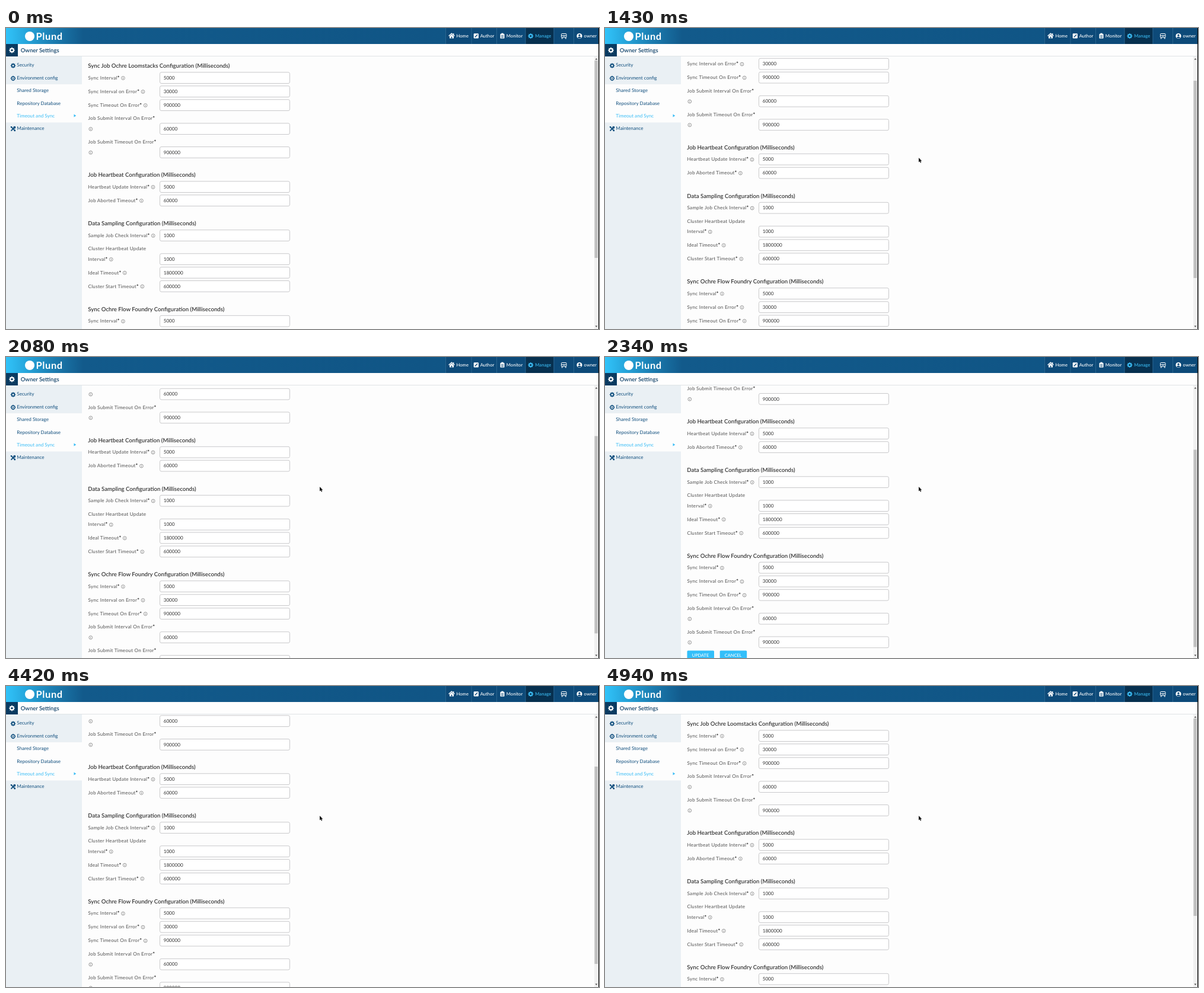
An HTML page with a canvas that plays this animation: 1000 by 508 pixels, repeating every 5590 ms.

```html
<!DOCTYPE html>
<html lang="en">
<head>
<meta charset="utf-8">
<title>Timeout and Sync</title>
<style>
html, body { margin: 0; width: 100%; height: 100%; overflow: hidden; background: #fdfdfd; }
canvas { display: block; width: 1000px; height: 508px; }
</style>
</head>
<body>
<canvas id="stage" width="1000" height="508"></canvas>
<script>
const ctx = document.getElementById('stage').getContext('2d');
const LOOP = 5590;
const CURSOR_FROM = 1430;
const NAVY = '#12507f', CYAN = '#3bbdf5', DARK = '#0a3b61', WHITE = '#fff';

const SCROLL = [
  [0, 0], [1040, 15.5], [1170, 36], [1300, 46], [1430, 46.5],
  [1690, 62], [1820, 82], [1950, 93], [2080, 107.5], [2210, 128],
  [2340, 139], [2470, 150], [2600, 153.5],
  [4420, 111], [4550, 69], [4680, 30], [4810, 6], [4940, 0]
];

const syncRows = [
  ['Sync Interval', 5000], ['Sync Interval on Error', 30000], ['Sync Timeout On Error', 900000],
  ['Job Submit Interval On Error*|', 60000], ['Job Submit Timeout On Error*|', 900000]
];
const SECTIONS = [
  { y: 64, title: 'Sync Job Ochre Loomstacks', rows: syncRows },
  { y: 248, title: 'Job Heartbeat', rows: [['Heartbeat Update Interval', 5000], ['Job Aborted Timeout', 60000]] },
  { y: 330, title: 'Data Sampling', rows: [
    ['Sample Job Check Interval', 1000], ['Cluster Heartbeat Update|Interval', 1000],
    ['Ideal Timeout', 1800000], ['Cluster Start Timeout', 600000]] },
  { y: 474.5, title: 'Sync Ochre Flow Foundry', rows: syncRows }
];

function text(str, x, y, size, color, weight = 400, spacing = 0) {
  ctx.font = `${weight} ${size}px Lato, sans-serif`;
  ctx.letterSpacing = spacing + 'px';
  ctx.fillStyle = color;
  ctx.fillText(str, x, y);
  return x + ctx.measureText(str).width;
}

function box(x, y, w, h, fill) {
  ctx.fillStyle = fill;
  ctx.fillRect(x, y, w, h);
}

function rounded(x, y, w, h, r, fill, stroke) {
  ctx.beginPath();
  ctx.roundRect(x, y, w, h, r);
  if (fill) { ctx.fillStyle = fill; ctx.fill(); }
  if (stroke) { ctx.strokeStyle = stroke; ctx.lineWidth = 1; ctx.stroke(); }
}

function disc(x, y, r, fill) {
  ctx.beginPath();
  ctx.arc(x, y, r, 0, 7);
  ctx.fillStyle = fill;
  ctx.fill();
}

function ring(x, y, r, color, width) {
  ctx.beginPath();
  ctx.arc(x, y, r, 0, 7);
  ctx.strokeStyle = color;
  ctx.lineWidth = width;
  ctx.stroke();
}

function line(points, color, width) {
  ctx.beginPath();
  points.forEach(([x, y]) => ctx.lineTo(x, y));
  ctx.strokeStyle = color;
  ctx.lineWidth = width;
  ctx.stroke();
}

function shape(points, fill) {
  ctx.beginPath();
  points.forEach(([x, y]) => ctx.lineTo(x, y));
  ctx.closePath();
  ctx.fillStyle = fill;
  ctx.fill();
}

function gear(x, y, r, color, hole) {
  const teeth = [];
  for (let i = 0; i < 32; i++) {
    const a = (i - 0.5) * Math.PI / 16, d = i % 4 < 2 ? r : r * 0.76;
    teeth.push([x + d * Math.cos(a), y + d * Math.sin(a)]);
  }
  shape(teeth, color);
  disc(x, y, r * 0.35, hole);
}

function infoIcon(x, y) {
  ring(x, y, 2.9, '#666', 0.65);
  box(x - 0.35, y - 0.4, 0.7, 2, '#666');
  box(x - 0.35, y - 1.7, 0.7, 0.7, '#666');
}

function label(str, y) {
  const [name, star] = str.split('*');
  const end = text(name, 138.5, y + 2.8, 8.15, '#505050', 400, 0.26);
  if (star !== undefined) text('*', end, y + 2.8, 8.6, '#222', 700);
  return end;
}

function field(value, y) {
  rounded(259.5, y - 9.2, 219, 18.7, 2.5, WHITE, '#c9c9cb');
  text(String(value), 265.7, y + 2.8, 8.15, '#333');
}

function button(str, x, y, textX) {
  rounded(x, y - 8, 45.5, 16, 1.5, '#33bffa');
  text(str, textX, y + 2.7, 7.4, WHITE, 500);
}

function drawForm(offset) {
  ctx.save();
  ctx.beginPath();
  ctx.rect(128, 48, 864, 460);
  ctx.clip();
  ctx.translate(0, -offset);
  for (const { y, title, rows } of SECTIONS) {
    text(title + ' Configuration (Milliseconds)', 138.3, y + 3.1, 9.65, '#333', 600);
    let rowY = y + 20;
    for (const [name, value] of rows) {
      const [first, second] = name.split('|');
      let end;
      if (second === undefined) {
        end = label(first + '*', rowY);
      } else {
        label(first, rowY - 0.5);
        rowY += 17;
        end = second ? label(second + '*', rowY) : 133;
      }
      infoIcon(end + 9.8, rowY + 0.5);
      field(value, rowY);
      rowY += 23 - (second === undefined ? 0 : 0.3);
    }
  }
  button('UPDATE', 138.5, 642.5, 146.7);
  button('CANCEL', 193.7, 642.5, 201.8);
  ctx.restore();
}

function drawScrollbar(offset) {
  box(992, 48, 7, 460, '#f1f1f1');
  box(992.5, 55 + offset * 0.73, 5.5, 333, '#c1c1c1');
  shape([[993.5, 53.5], [997.5, 53.5], [995.5, 51]], '#555');
  shape([[993.5, 502.5], [997.5, 502.5], [995.5, 505]], '#555');
}

function drawSidebar() {
  box(0, 48, 128, 460, '#eaf0f4');
  box(0, 95, 128, 64.5, '#fdfdfd');
  const item = (str, y, color = NAVY) => text(str, 18.3, y + 2.8, 8.15, color);
  item('Security', 62.5);
  item('Environment config', 84);
  item('Shared Storage', 105.3);
  item('Repository Database', 126.7);
  item('Timeout and Sync', 148, CYAN);
  item('Maintenance', 169.5);
  shape([[114.5, 145.5], [118.3, 148], [114.5, 150.5]], CYAN);

  gear(12, 63.5, 4.3, NAVY, '#eaf0f4');
  ring(12, 85, 3, NAVY, 1.3);
  disc(12, 85, 1.1, NAVY);
  for (const [dx, dy] of [[1, 0], [-1, 0], [0, 1], [0, -1]])
    line([[12 + dx * 2, 85 + dy * 2], [12 + dx * 4.3, 85 + dy * 4.3]], NAVY, 1);
  line([[8.5, 166.7], [15.5, 173.7]], NAVY, 1.8);
  line([[15, 167], [8.5, 173.7]], NAVY, 1.8);
  ring(14.4, 167.8, 1.5, NAVY, 1.2);
  box(7.8, 166, 2.4, 2.2, NAVY);
  disc(14.8, 173, 1.4, NAVY);
}

function drawNav() {
  box(741, 0, 258, 27, '#0d4a79');
  box(876, 0, 47.5, 27, '#07304f');
  for (const x of [741, 784.5, 827, 875.5, 923.5, 957]) box(x, 0, 1, 27, '#2a658f');
  const item = (str, x, color = WHITE) => text(str, x, 15.8, 7.65, color, 500);
  item('Home', 759.5);
  item('Author', 799.7);
  item('Monitor', 843.8);
  item('Manage', 892.3, CYAN);
  item('owner', 974.6);

  line([[746.5, 13.5], [751.5, 9.2], [756.5, 13.5]], WHITE, 1.3);
  shape([[748, 13.8], [751.5, 10.8], [755, 13.8], [755, 17.5], [748, 17.5]], WHITE);
  box(754, 9, 1.3, 3, WHITE);
  box(750.7, 14.7, 1.7, 2.8, '#0d4a79');

  rounded(788.7, 9.3, 8.2, 8.2, 1.2, WHITE);
  line([[790.8, 15.5], [795, 11.2]], '#0d4a79', 1.4);

  rounded(833.5, 9.7, 7, 8, 1, WHITE);
  box(835.5, 8.7, 3, 2, WHITE);
  for (const y of [12.2, 14, 15.8]) box(835, y, 4, 0.8, '#0d4a79');

  gear(884.8, 13.5, 4.6, CYAN, '#07304f');

  rounded(936.5, 9.5, 8.5, 6.5, 1, null, WHITE);
  box(936.5, 12, 8.5, 0.8, WHITE);
  box(938.5, 13.6, 4.5, 0.8, WHITE);
  box(937, 16, 1.4, 2.4, WHITE);
  box(943.2, 16, 1.4, 2.4, WHITE);

  disc(967, 13.5, 4.6, WHITE);
  disc(967, 12.2, 1.6, '#0d4a79');
  ctx.beginPath();
  ctx.ellipse(967, 16, 2.8, 1.5, 0, 0, 7);
  ctx.fill();
}

function drawHeader() {
  const blue = ctx.createLinearGradient(0, 0, 1000, 0);
  blue.addColorStop(0, '#31c3f9');
  blue.addColorStop(0.03, '#27a9df');
  blue.addColorStop(0.08, '#1b7cb0');
  blue.addColorStop(0.13, '#125a8b');
  blue.addColorStop(1, '#0f5383');
  box(0, 0, 1000, 27, blue);
  disc(40, 14, 8, WHITE);
  text('Plund', 50.5, 20, 16.5, WHITE, 700, 0.6);
  drawNav();

  box(0, 27, 1000, 21, '#fefefe');
  box(0, 47, 1000, 1, '#dfe3e6');
  box(0, 27, 20, 21, DARK);
  gear(10, 37.5, 4.9, WHITE, DARK);
  text('Owner Settings', 24.7, 41, 9.5, '#0f4168', 600);
}

function drawCursor() {
  ctx.beginPath();
  for (const [x, y] of [[0, 0], [0, 7.6], [1.8, 6.1], [3, 8.7], [4.2, 8.1], [3.1, 5.6], [5.4, 5.4]])
    ctx.lineTo(529 + x, 219 + y);
  ctx.closePath();
  ctx.strokeStyle = WHITE;
  ctx.lineWidth = 1;
  ctx.stroke();
  ctx.fillStyle = '#111';
  ctx.fill();
}

function scrollAt(time) {
  return SCROLL.findLast(([start]) => start <= time)[1];
}

function draw(time) {
  const offset = scrollAt(time);
  ctx.textRendering = 'geometricPrecision';
  box(0, 0, 1000, 508, '#fdfdfd');
  drawForm(offset);
  drawSidebar();
  drawScrollbar(offset);
  drawHeader();
  box(999, 0, 1, 508, '#000');
  if (time >= CURSOR_FROM) drawCursor();
}

const startTime = performance.now();
function tick() {
  draw((performance.now() - startTime) % LOOP);
  requestAnimationFrame(tick);
}
tick();
</script>
</body>
</html>
```
